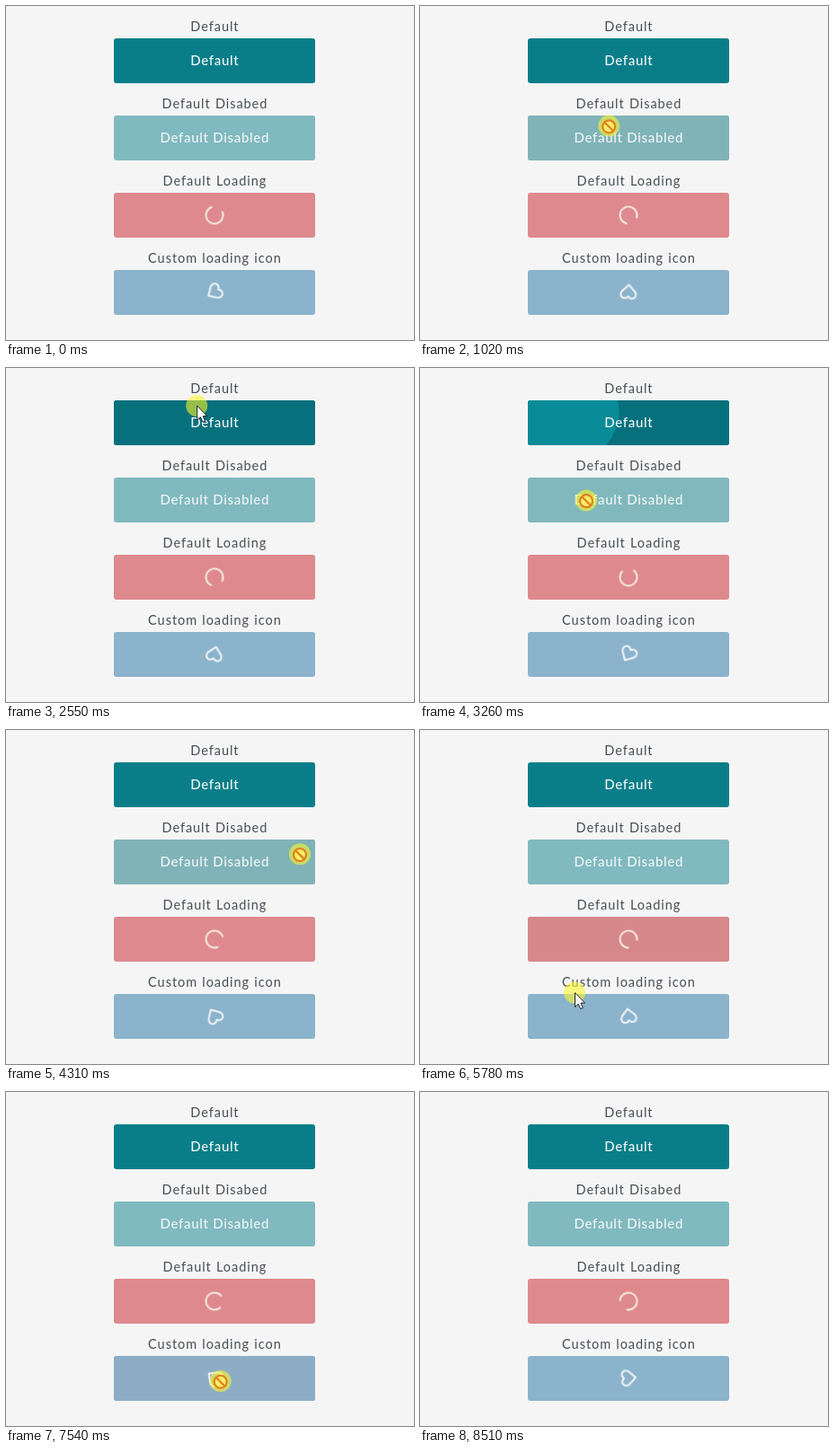
These frames come from a looping animation (454 by 372 pixels, 8580 ms). An HTML page:

```html
<!DOCTYPE html>
<html lang="en">
<head>
<meta charset="utf-8">
<title>Buttons</title>
<style>
  html, body { margin: 0; width: 100%; height: 100%; overflow: hidden; background: #f5f5f5; }
  svg { display: block; width: 454px; height: 372px; }
  text { font-family: Lato, "Open Sans", sans-serif; text-anchor: middle; }
  .label { fill: #484d55; font-size: 14.5px; letter-spacing: .95px; word-spacing: .6px; }
  .caption { fill: #f4f8f8; font-size: 15px; font-weight: 500; letter-spacing: .7px; }
  .muted { fill: #eff6f7; }
  .spin { fill: none; stroke-linecap: round; animation: spin 8.58s linear infinite; }
  .ring { stroke: #f5e8de; stroke-width: 2; --from: 24deg; }
  .heart { stroke: #ecf1f4; stroke-width: 2.1; stroke-linejoin: round; --from: 58deg; }
  @keyframes spin {
    from { transform: rotate(var(--from)); }
    to { transform: rotate(calc(var(--from) - 1968deg)); }
  }
</style>
</head>
<body>
<svg viewBox="0 0 454 372">
  <clipPath id="face"><rect x="120" y="36" width="224" height="50" rx="3"/></clipPath>

  <g id="buttons"></g>
  <g id="ripples" clip-path="url(#face)" fill="#098b98"></g>

  <text class="label" x="232.4" y="28">Default</text>
  <text class="label" x="232.4" y="114">Default Disabed</text>
  <text class="label" x="232.4" y="200">Default Loading</text>
  <text class="label" x="232.4" y="286">Custom loading icon</text>
  <text class="caption" x="232.3" y="66">Default</text>
  <text class="caption muted" x="232.3" y="152">Default Disabled</text>

  <g transform="translate(232 233)">
    <path class="spin ring" d="M6.5 -6.9A9.5 9.5 0 1 1 -6.5 -6.9"/>
  </g>
  <g transform="translate(232 318.5)">
    <path class="spin heart" d="M0 8L-7 .8C-11.5 -4.5 -4.5 -10.5 0 -5C4.5 -10.5 11.5 -4.5 7 .8Z"/>
  </g>

  <g id="cursor">
    <circle cy="-.7" r="12" fill="#fff828" opacity=".58"/>
    <path id="arrow" d="M.5 -.5V15.5L4.2 12L6.7 17.6L9.3 16.5L6.9 11H11.5Z" fill="#fff" stroke="#222"/>
    <g id="blocked" fill="#f8ee68" stroke="#e2801f" stroke-width="2.2">
      <circle r="7"/>
      <path d="M-4.9 -4.9L4.9 4.9"/>
    </g>
  </g>
</svg>
<script>
  const LOOP = 8580;
  const LEFT = 120, TOP = 36, WIDTH = 224, HEIGHT = 50, PITCH = 86;
  const FADE = 300;
  const $ = id => document.getElementById(id);
  const clamp = v => Math.max(0, Math.min(1, v));

  function add(parent, tag, attrs) {
    const el = document.createElementNS("http://www.w3.org/2000/svg", tag);
    for (const name in attrs) el.setAttribute(name, attrs[name]);
    return $(parent).appendChild(el);
  }

  // Each button is its plain colour with a hover colour fading in above it
  const shades = [
    ["#097e89", "#06717d"], ["#80b9bf", "#80b3b8"],
    ["#de898d", "#d5878a"], ["#8bb3cc", "#8cadc5"]
  ];
  const hovers = shades.map(([base, hover], i) => {
    const box = { x: LEFT, y: TOP + i * PITCH, width: WIDTH, height: HEIGHT, rx: 3 };
    add("buttons", "rect", { ...box, fill: base });
    return add("buttons", "rect", { ...box, fill: hover });
  });

  const ripples = [
    { start: 1500, end: 2350, cx: 153, cy: 82 },
    { start: 3000, end: 3600, cx: 164, cy: 48 }
  ];
  for (const r of ripples) r.el = add("ripples", "circle", { cx: r.cx, cy: r.cy });

  // Pointer stops: time, x, y
  const stops = [
    [0, 236, 400], [850, 228, 165], [1500, 154, 84], [1850, 347, 82], [2700, 185, 40],
    [3140, 168, 72], [3260, 185, 148], [3650, 138, 150], [4310, 327, 139],
    [5640, 173, 252], [5780, 172, 293], [6340, 183, 320], [6690, 288, 317], [8120, 211, 326]
  ];
  const HIDE_AT = stops.at(-1)[0];

  // Speed through a stop; zero where the pointer turns back
  function speed(i, axis) {
    const p = stops[i], a = stops[i - 1] || p, b = stops[i + 1] || p;
    if ((p[axis] - a[axis]) * (b[axis] - p[axis]) <= 0) return 0;
    return (b[axis] - a[axis]) / (b[0] - a[0]);
  }

  function pointer(t) {
    t = Math.max(0, Math.min(t, HIDE_AT));
    const i = Math.max(1, stops.findIndex(s => s[0] >= t));
    const a = stops[i - 1], b = stops[i], d = b[0] - a[0];
    const u = (t - a[0]) / d, v = 1 - u;
    return [1, 2].map(k =>
      v * v * ((1 + 2 * u) * a[k] + u * d * speed(i - 1, k)) +
      u * u * ((1 + 2 * v) * b[k] - v * d * speed(i, k)));
  }

  function hovered(t) {
    const [x, y] = pointer(t), row = Math.floor((y - TOP) / PITCH);
    const inside = x >= LEFT && x <= LEFT + WIDTH && y - TOP - row * PITCH <= HEIGHT;
    return inside && t < HIDE_AT ? row : -1;
  }

  // Share of the recent past spent over each button
  function hoverLevels(t) {
    const levels = shades.map(() => 0), samples = 20;
    for (let i = 0; i < samples; i++) {
      const row = hovered(t - i * FADE / samples);
      if (row in levels) levels[row] += 1.4 / samples;
    }
    return levels.map(clamp);
  }

  function draw(t) {
    hoverLevels(t).forEach((level, i) => hovers[i].setAttribute("opacity", level));

    for (const r of ripples) {
      const live = t > r.start && t < r.end;
      r.el.setAttribute("r", live ? (t - r.start) * 0.22 : 0);
      r.el.setAttribute("opacity", clamp((r.end - t) / FADE));
    }

    const [x, y] = pointer(t), barred = hovered(t) > 0;
    $("cursor").setAttribute("transform", `translate(${x.toFixed(2)} ${y.toFixed(2)})`);
    $("cursor").style.display = t < HIDE_AT ? "" : "none";
    $("arrow").style.display = barred ? "none" : "";
    $("blocked").style.display = barred ? "" : "none";
  }

  const begin = performance.now();
  function tick() {
    draw((performance.now() - begin) % LOOP);
    requestAnimationFrame(tick);
  }
  tick();
</script>
</body>
</html>
```
